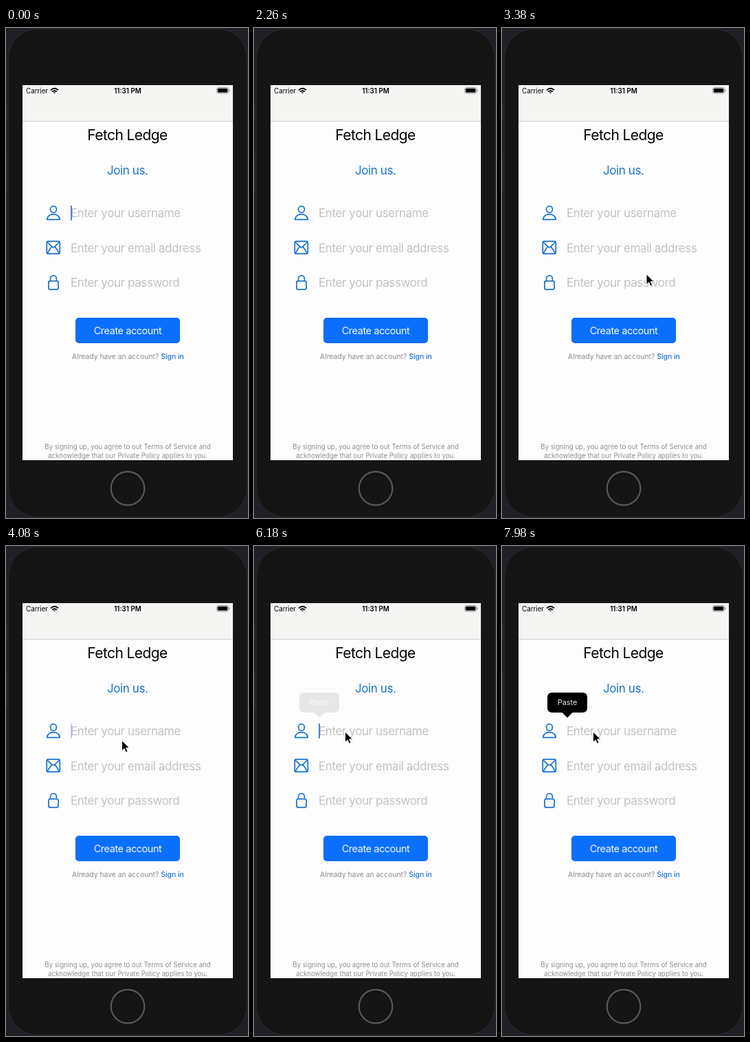
Recreate the animation shown at these times as an HTML page. Size 352 by 712 pixels, loop 8 s.

```html
<!DOCTYPE html>
<html lang="en">
<head>
<meta charset="utf-8">
<title>Sign-up screen</title>
<style>
  html, body { margin: 0; width: 100%; height: 100%; overflow: hidden; background: #202127; }
  svg { display: block; width: 100%; height: 100%; font-family: Inter, Roboto, sans-serif; }
  .mid { text-anchor: middle; }
  .field { font-size: 17px; letter-spacing: -.4px; fill: #c2c2c5; }
  .icon { fill: none; stroke: #1a74d2; stroke-width: 1.75; stroke-linejoin: round; stroke-linecap: round; }
  .small { font-size: 9.65px; fill: #8e8e90; }
</style>
</head>
<body>
<svg viewBox="0 0 352 712">
  <!-- phone body -->
  <rect width="352" height="712" fill="#202127"/>
  <rect x="3.5" y="1.5" width="347" height="709" rx="42" fill="#151516" stroke="#29292d"/>
  <path d="M1 111V136M1 183V238" stroke="#29292d" stroke-width="2"/>
  <circle cx="177" cy="669" r="24.3" fill="none" stroke="#58585a" stroke-width="2.2"/>

  <!-- screen -->
  <rect x="24" y="83" width="306" height="545" fill="#fdfdfe"/>
  <rect x="24" y="83" width="306" height="52" fill="#f5f5f3"/>
  <path d="M24 135.5H330" stroke="#d0d0d0"/>

  <!-- status bar -->
  <text x="29" y="95" font-size="9.8">Carrier</text>
  <g fill="none" stroke="#000" stroke-width="1.9">
    <path d="M65.2 90.2Q70.6 85.4 76 90.2M67.3 92.6Q70.6 89.8 73.9 92.6"/>
    <path d="M69 93.6H72.2L70.6 95.6Z" fill="#000" stroke="none"/>
  </g>
  <text class="mid" x="177" y="95" font-size="9.8" font-weight="600">11:31 PM</text>
  <rect x="306.5" y="86.5" width="17" height="8.6" rx="2.6" fill="none" stroke="#8a8a8a" stroke-width=".9"/>
  <rect x="307.8" y="87.8" width="14.4" height="6" rx="1.5"/>
  <path d="M324.8 89.3V92.3" stroke="#8a8a8a" stroke-width="1.2"/>

  <!-- form -->
  <text class="mid" x="176.5" y="163" font-size="21" letter-spacing="-.6">Fetch Ledge</text>
  <text class="mid" x="176.8" y="212.6" font-size="17" letter-spacing="-.4" fill="#1a74cc">Join us.</text>

  <g class="icon">
    <ellipse cx="69" cy="263.5" rx="4.4" ry="4.9"/>
    <path d="M59.8 278.3C59.8 268.2 78.2 268.2 78.2 278.3Z"/>
    <rect x="59.3" y="309.8" width="19" height="18.4" rx="2.5"/>
    <path d="M60 311L66.4 317.4Q68.8 319.8 71.2 317.4L77.6 311M60 327.4L66.2 318M77.6 327.4L71.4 318"/>
    <rect x="62" y="367.5" width="14" height="12.3" rx="2"/>
    <path d="M64.6 367V364.2A4.4 4.6 0 0 1 73.4 364.2V367"/>
  </g>
  <g class="field">
    <text x="94" y="275">Enter your username</text>
    <text x="94" y="325.8">Enter your email address</text>
    <text x="94" y="376.3">Enter your password</text>
  </g>
  <rect id="caret" x="94.2" y="258" width="1.7" height="21.5" fill="#3c66d8"/>

  <rect x="101" y="421" width="152" height="37" rx="5" fill="#0a6ffd"/>
  <text class="mid" x="177" y="445" font-size="14.5" letter-spacing="-.45" fill="#f4f8ff">Create account</text>
  <text x="96" y="481.3" font-size="10.35" fill="#8a8a8c">Already have an account? <tspan fill="#1a74d2" font-weight="500">Sign in</tspan></text>
  <text class="mid small" x="177" y="612">By signing up, you agree to out Terms of Service and</text>
  <text class="mid small" x="177" y="625.2">acknowledge that our Private Policy applies to you.</text>

  <g id="menu">
    <path d="M73 213H117Q124 213 124 220V235Q124 242 117 242H102.5L95 249.5L87.5 242H73Q66 242 66 235V220Q66 213 73 213Z"/>
    <text class="mid" x="95" y="231.3" font-size="10.8" fill="#f0f0f0">Paste</text>
  </g>
  <path id="pointer" d="M0 0V15.2L3.5 11.9L6 17.3L8.5 16.2L6.1 10.9H11Z" stroke="#fff" stroke-width="1"/>
</svg>
<script>
const LOOP = 8000, TAP = 5100;
const [caret, menu, pointer] = ["caret", "menu", "pointer"].map(id => document.getElementById(id));
const clamp = v => Math.min(1, Math.max(0, v));
const ramp = (t, from, to) => clamp((t - from) / (to - from));
const ease = v => v * v * (3 - 2 * v);

// time, x, y of the pointer tip
const path = [[2300, 352, 470], [2780, 210.5, 358.5], [3340, 210.5, 358.5],
              [4000, 168.5, 282.5], [4180, 168.5, 282.5], [4800, 132.5, 270]];

function pointerAt(t) {
  let [, x, y] = path[0];
  for (let i = 1; i < path.length; i++) {
    const [t0, x0, y0] = path[i - 1], [t1, x1, y1] = path[i];
    const k = ease(ramp(t, t0, t1));
    if (t >= t0) { x = x0 + (x1 - x0) * k; y = y0 + (y1 - y0) * k; }
  }
  return [x, y];
}

// One-second blink; the tap restarts it
function caretAt(t) {
  const p = (t < TAP ? t + 480 : t - TAP) % 1000;
  return 1 - ramp(p, 490, 600) + ramp(p, 920, 1000);
}

function draw(t) {
  const [x, y] = pointerAt(t);
  pointer.setAttribute("transform", `translate(${x} ${y})`);
  pointer.style.display = t < path[0][0] ? "none" : "";
  caret.style.opacity = caretAt(t);
  menu.style.opacity = ramp(t, 6160, 6400);
}

const start = performance.now();
function tick() {
  draw((performance.now() - start) % LOOP);
  requestAnimationFrame(tick);
}
tick();
</script>
</body>
</html>
```
